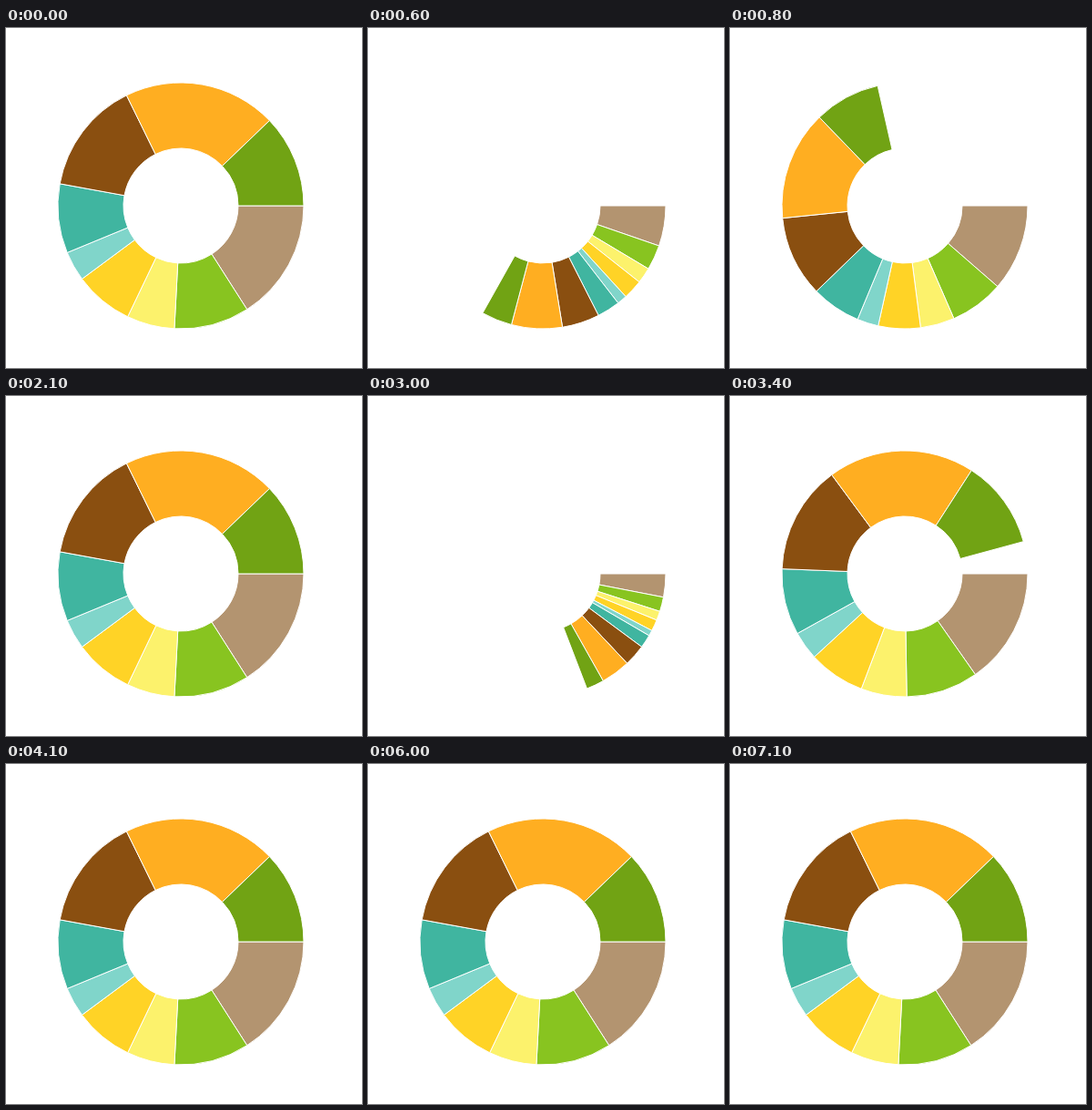
An HTML page with a canvas for the animation above (7500 ms loop, 391 by 373 pixels).

```html
<!DOCTYPE html>
<html>
<head>
<meta charset="utf-8">
<style>
  html, body { margin: 0; width: 100%; height: 100%; overflow: hidden; background: #fff; }
  canvas { display: block; }
</style>
</head>
<body>
<canvas id="chart" width="391" height="373"></canvas>
<script>
const ctx = document.getElementById('chart').getContext('2d');
const LOOP = 7500, STEP = 100, SWEEP = 522;
const CX = 192, CY = 195, OUTER = 135, INNER = 63;

// Colour and clockwise end angle in degrees, starting at three o'clock
const slices = [
  ['#b39470', 57.4], ['#88c420', 93], ['#fcf26c', 115.6],
  ['#ffd326', 143.5], ['#80d5ca', 157.6], ['#40b5a0', 190.3],
  ['#8a4f10', 243.8], ['#ffae21', 316.2], ['#71a314', 360]
];

// The ring is redrawn twice per loop
function progress(t) {
  const start = t >= 3000 ? 2900 : t >= 500 ? 427 : -SWEEP;
  return Math.min(1, (t - start) / SWEEP);
}

function draw(t) {
  const scale = progress(t) * Math.PI / 180;
  ctx.clearRect(0, 0, 391, 373);
  ctx.strokeStyle = '#fff';
  ctx.lineWidth = 1;
  let from = 0;
  for (const [color, end] of slices) {
    const to = end * scale;
    ctx.beginPath();
    ctx.arc(CX, CY, OUTER, from, to);
    ctx.arc(CX, CY, INNER, to, from, true);
    ctx.closePath();
    ctx.fillStyle = color;
    ctx.fill();
    ctx.stroke();
    from = to;
  }
}

function tick() {
  const t = performance.now() % LOOP;
  draw(Math.floor(t / STEP) * STEP);
  requestAnimationFrame(tick);
}
tick();
</script>
</body>
</html>
```
